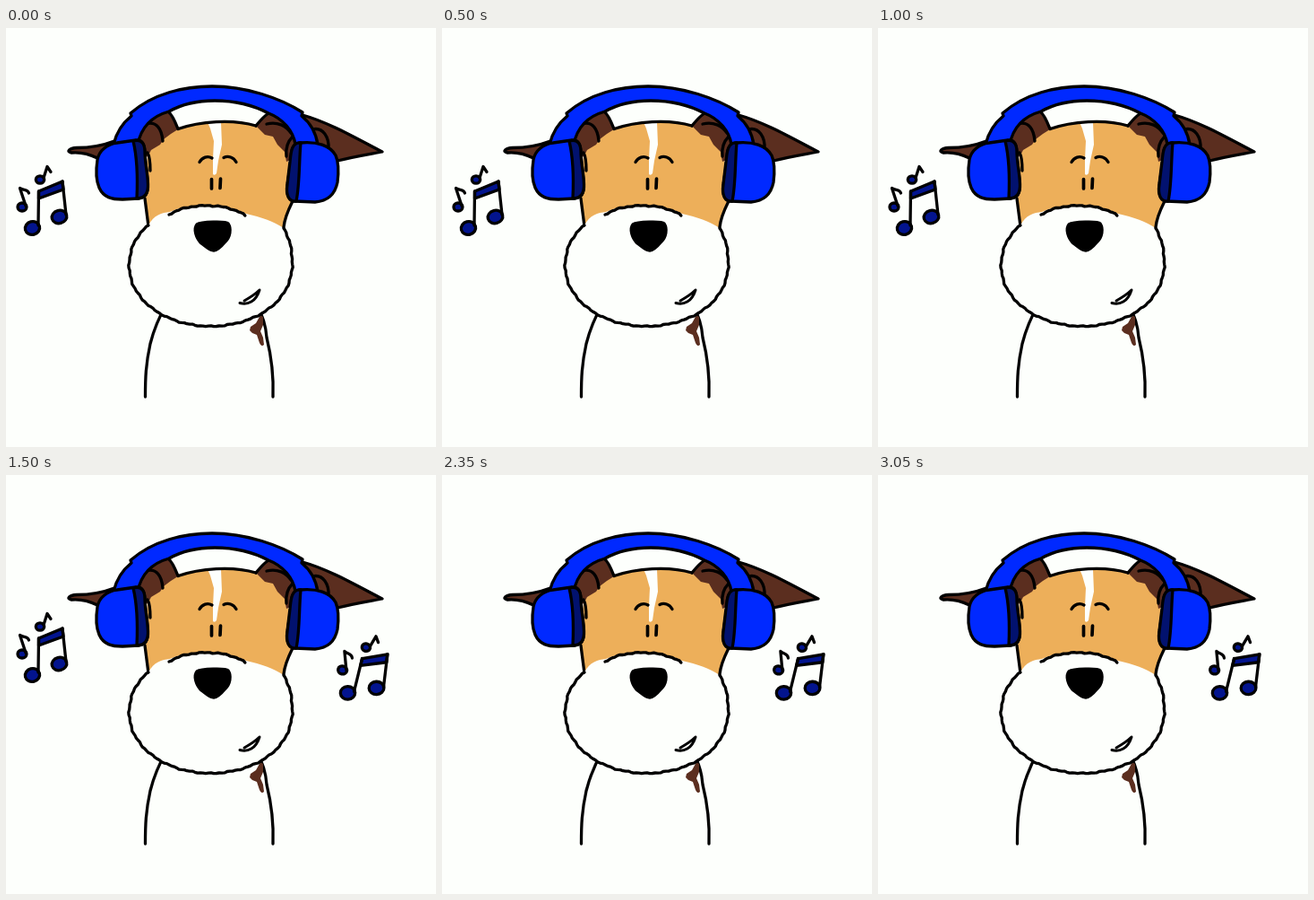
An HTML page for the animation above (3400 ms loop, 480 by 467 pixels).

```html
<!DOCTYPE html>
<html lang="en">
<head>
<meta charset="utf-8">
<title>Dog with headphones</title>
<style>
  html, body { margin: 0; width: 100%; height: 100%; overflow: hidden; background: #fdfffc; }
  svg { display: block; width: 100vw; height: 100vh; }
  .ink { stroke: #000; stroke-width: 3.3; stroke-linecap: round; stroke-linejoin: round; fill: none; }
  .ink .blue { fill: #0029ff; }
  .ink .navy { fill: #02126f; }
  .ink .brown { fill: #5b2e1f; }
  .ink .white { fill: #fdfffc; }
  .ink .bare { stroke: none; }
  .ink .note { fill: #03148e; }
</style>
</head>
<body>
<svg viewBox="0 0 480 467" preserveAspectRatio="none">
  <defs>
    <g id="notes" class="ink">
      <ellipse class="note" cx="18" cy="199.500" rx="5" ry="4.500"/>
      <path d="M22 198L15.500 178.500C18 181 24 179 25.500 184"/>
      <ellipse class="note" cx="38" cy="169" rx="4.700" ry="4.200"/>
      <path d="M42 167L46 154.500L50 160.500"/>
      <ellipse class="note" cx="29.500" cy="223" rx="8.200" ry="7.300" transform="rotate(-15 29.500 223)"/>
      <ellipse class="note" cx="59.500" cy="210.500" rx="8.400" ry="7.200" transform="rotate(-15 59.500 210.500)"/>
      <path class="note" d="M36.500 182L63 171L64 180L36.500 190Z"/>
      <path d="M36 220L36.500 182M67 208L63 171"/>
    </g>
  </defs>

  <g id="dog" class="ink">
    <path d="M179 308C171 322 165 336 161 352C156 375 155.500 390 155.500 411M280 309C287 321 290 331 291 345C296 365 299 385 298 411"/>
    <path class="brown bare" d="M284 320L279 329L273 333L272 337L275 340L280 342L283 351Q285 356 288 353L287 345L284 338L287 331L287 322Z"/>

    <g id="head">
      <path class="bare" fill="#edaf5a" d="M158 140C168 128 180 118 192 113C215 104 255 101 280 110L314 130L319 194C314 203 311 212 310 224L268 232L159 222L155 190Z"/>
      <path class="white bare" d="M225 105L228 112L232 126L231 146L231 163Q233 165 235 162L237 148L241 130L240 105Z"/>
      <path d="M192 112.500C216 104 253 101 279 109M155 190L159 221M319.500 194C315 203 311 212 310 222"/>

      <!-- Ears -->
      <path class="brown bare" d="M145 126L158 105L181 93L192 113L184 118L176 124L172 130L162 136L158 144Z"/>
      <path class="brown bare" d="M279 109L293 95L312 105L326 126L320 146L313 149L311 138L303 130L298 121L289 119Z"/>
      <path d="M181 93C186 97 189 105 192 112.500M279 109C283 104 287 99 293 95M156 107C168 103 174 113 175 126M158 139C161 144 161 151 161 159M291 107C303 104 313 109 318 117M320 121C314 127 312 134 313 143"/>
      <path class="brown" d="M121 126C108 131 94 133.500 79 133.500C70 134 67 138 73 139C84 138 92 140 102 145L123 140Z"/>
      <path class="brown" d="M331 97C360 105 391 123 420 138C404 141 386 144 370 148L344 132Z"/>
      <path d="M342 113C354 110 361 122 360 135"/>

      <!-- Headphones -->
      <path class="blue" d="M120 130C123 117 130 106 140 98L139 95C164 73 199 65 230 65C268 65 306 78 331 94L330 98C340 106 346 117 348 130L323 130C321 115 309 101 293 95C276 86 256 81 233 81C217 81 198 84 182 93C164 98 151 109 147 130Z"/>
      <path class="blue" d="M124 128C114 129 104 136 102 147C100 160 101 171 104 178C109 189 118 191 130 191L148 190C156 189 159 184 158 175C158 160 155 149 155 137C154 127 151 125 145 125Z"/>
      <path class="navy" d="M142 126C152 123 155 130 155 138C155 150 158 160 158.500 174C159 184 155 190 146 190C147 169 147 147 142 126Z"/>
      <path class="blue" d="M328 128C347 126 362 131 368 142C372 151 371 164 370 172C367 187 358 193 345 194L322 193C315 192 313 186 314 175L318 148C318 135 320 129 328 128Z"/>
      <path class="navy" d="M329 128C319 127 318 138 317 149L314 174C312 187 316 194 324 193C328 174 327 150 329 128Z"/>

      <!-- Muzzle -->
      <path class="white bare" d="M159 220C165 208 174 206 183 205C196 199 211 197 225 198C244 198 258 202 268 207C285 211 298 215 310 223C318 237 321 252 320 265C319 306 278 332 228 332C178 332 138 304 137 267C137 247 145 231 159 220Z"/>
      <path class="rough" d="M159 220C145 231 137 247 137.500 267C139 304 178 332 228 332.500C278 332 318 306 319.500 265C320 252 318 237 310 223"/>
      <path class="rough" d="M182 208C195 200 210 198 225 198C242 198 257 202 267 209"/>

      <!-- Face -->
      <path fill="#000" d="M213 219C218 216 245 215 248 218C252 224 250 233 245 238C240 244 236 248 232 248C227 248 224 244 218 240C212 234 209 224 213 219Z"/>
      <path d="M216 149.500C219 144 225 142 230 145M243 144.500C248 142 254 144 257 149.500"/>
      <path stroke-width="3.700" d="M229.500 168.500V179M239.500 168L239 178.500"/>
      <path class="white" stroke-width="3" d="M261 306.500C270 309 279 305 283 292C278 297 273 300 266 304"/>
    </g>
  </g>

  <use id="left" href="#notes"/>
  <use id="right" href="#notes" transform="translate(352 20) rotate(13 30 223)"/>
</svg>
<script>
  const LOOP = 3400;
  const $ = id => document.getElementById(id);

  const REST = { dog: '', head: '' };
  const LEAN = { dog: 'rotate(-4 227 410)', head: '' };
  const LIFT = { dog: '', head: 'translate(1 -7.3)' };

  // start time, pose, left notes, right notes
  const steps = [
    [0, REST, 1, 0],
    [250, LEAN, 0, 1],
    [500, REST, 1, 0],
    [750, LEAN, 0, 1],
    [1000, REST, 1, 0],
    [1250, LEAN, 0, 1],
    [1500, REST, 1, 1],
    [2000, LIFT, 1, 0],
    [2350, REST, 0, 1],
    [2700, LIFT, 1, 0],
    [3050, REST, 0, 1]
  ];

  // Give the fur outline a slightly uneven hand-drawn edge.
  function roughen(path) {
    const length = path.getTotalLength();
    const count = Math.round(length / 3);
    const points = [];
    for (let i = 0; i <= count; i++) {
      const at = length * i / count;
      const p = path.getPointAtLength(at);
      const q = path.getPointAtLength(Math.min(length, at + 1));
      const r = path.getPointAtLength(Math.max(0, at - 1));
      const size = Math.hypot(q.x - r.x, q.y - r.y) || 1;
      const bump = 0.4 * Math.sin(i * 1.9) + 0.35 * Math.sin(i * 0.83);
      points.push([
        (p.x - (q.y - r.y) / size * bump).toFixed(1),
        (p.y + (q.x - r.x) / size * bump).toFixed(1)
      ].join(' '));
    }
    path.setAttribute('d', 'M' + points.join('L'));
  }

  function show(time) {
    const t = time % LOOP;
    const [, pose, left, right] = steps.findLast(step => step[0] <= t);
    $('dog').setAttribute('transform', pose.dog);
    $('head').setAttribute('transform', pose.head);
    $('left').style.display = left ? '' : 'none';
    $('right').style.display = right ? '' : 'none';
  }

  document.querySelectorAll('.rough').forEach(roughen);
  const start = performance.now();
  function tick() {
    show(performance.now() - start);
    requestAnimationFrame(tick);
  }
  tick();
</script>
</body>
</html>
```
